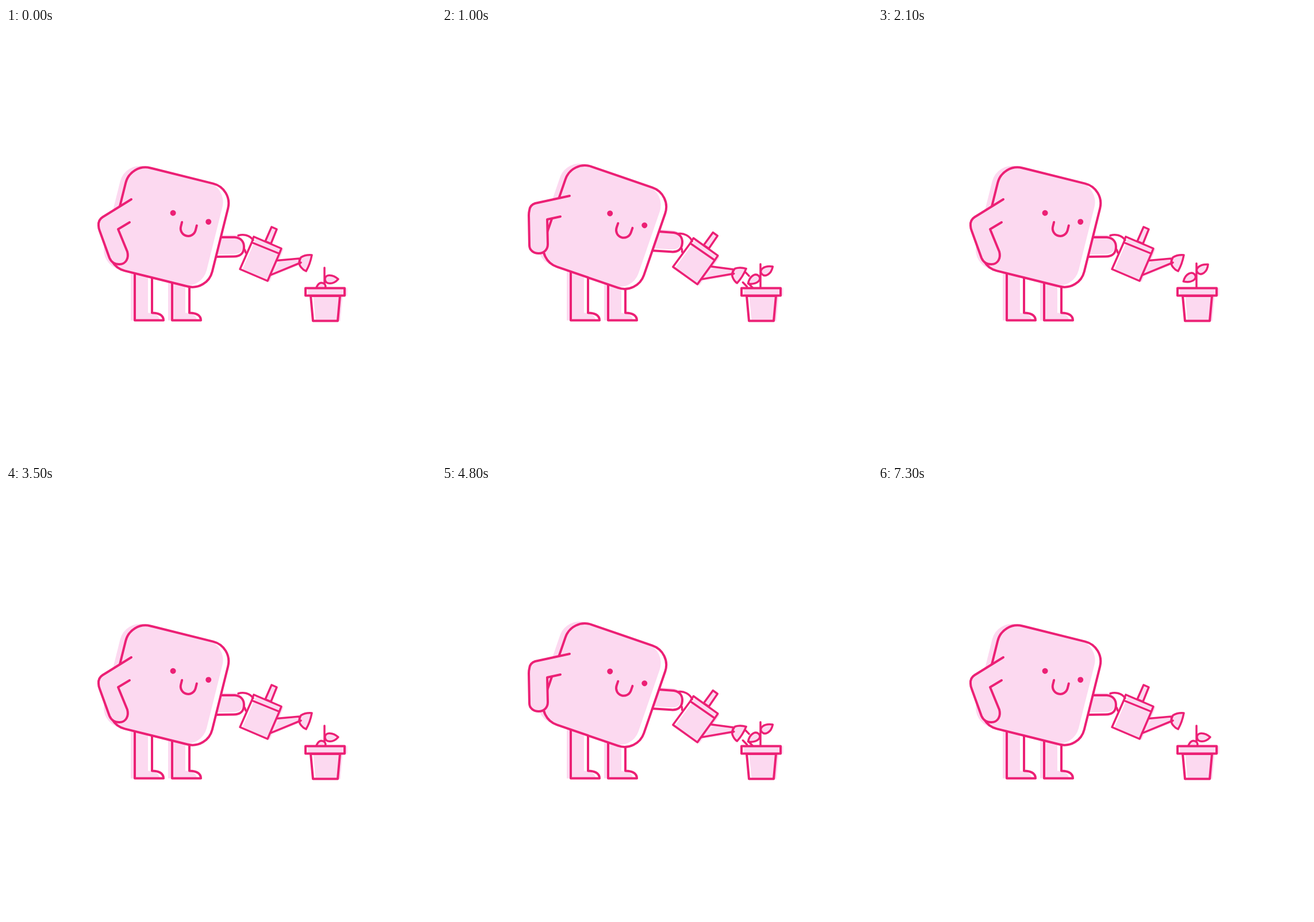
An HTML page that plays this animation: 748 by 748 pixels, repeating every 7.6 s.

```html
<!DOCTYPE html>
<html lang="en">
<head>
<meta charset="utf-8">
<title>Watering a plant</title>
<style>
  html, body { margin: 0; width: 100%; height: 100%; overflow: hidden; background: #fff; }
  svg { display: block; width: 100vw; height: 100vh; }
  .tint { fill: #fcd9f0; }
  .base { fill: #fff; }
  .line { fill: none; stroke: #ec2075; stroke-width: 4; stroke-linecap: round; stroke-linejoin: round; }
  .thin .line { stroke-width: 3.5; }
  .dot { fill: #ec2075; }
</style>
</head>
<body>
<svg viewBox="0 0 748 748">
  <defs>
    <clipPath id="above"><rect width="748" height="453"/></clipPath>
    <path id="leg" d="M224 400V508.5H274C274 500 266 495.5 254 495.5V400"/>
    <path id="hand" d="M-30 -17H0C11 -16 16 -9 16 0C16 10 10 16.5 -2 16.5L-38 17"/>
    <rect id="box" x="-91.7" y="-92.2" width="183.4" height="184.4" rx="35.5"/>
    <path id="leaf" d="M0 0C-1 -9 12 -10.5 23 0C13 10 1 8 0 0Z"/>
    <path id="pot" d="M521 452.5H589V465.5H521ZM530 466L534 509.5H577L581 466Z"/>
    <path id="can" d="M431 363L479 383.5L475.5 392.5L427.5 373ZM427.5 373L407 419.5L455 440L475.5 392.5Z"/>
    <path id="spout" d="M471 404.5L511 401Q509 412 513 408L459.5 430"/>
    <path id="rose" d="M532 395Q521 394 513 399Q507 410 514 417Q517 421 522 423Q529 411 532 395Z"/>
    <path id="stub" d="M462 346L471 350L461 375L451 371Z"/>
  </defs>

  <use class="tint" href="#leg" x="-7"/><use class="line" href="#leg"/>
  <use class="tint" href="#leg" x="58"/><use class="line" href="#leg" x="65"/>

  <g id="reach">
    <use class="tint" href="#hand" x="-1" y="-4"/><use class="line" href="#hand"/>
  </g>

  <g id="body">
    <use class="base" href="#box"/>
    <use class="tint" href="#box" x="-10"/>
    <use class="line" href="#box"/>
    <circle class="dot" cx="0.9" cy="-25.7" r="5"/>
    <circle class="dot" cx="64.4" cy="-25.7" r="5"/>
    <path class="line" d="M19.8 -14V-6A13.2 13.2 0 0 0 46.2 -6V-14.5"/>
  </g>
  <path id="armTint" class="tint"/><path id="armLine" class="line"/>

  <g id="pour" class="thin">
    <path class="line" d="M404 361C412 358 424 360 430 369M414 384Q416 386 417 391"/>
    <g class="tint" transform="translate(3.7 1.6)">
      <use href="#can"/><use href="#spout"/>
    </g>
    <use class="tint" href="#rose"/><use class="tint" href="#stub"/>
    <g class="line">
      <use href="#can"/><use href="#spout"/><use href="#rose"/><use href="#stub"/>
    </g>
  </g>

  <g class="thin" clip-path="url(#above)">
    <path id="stem" class="line"/>
    <g id="leafR"><use class="tint" href="#leaf"/><use class="line" href="#leaf"/></g>
    <g id="leafL"><use class="tint" href="#leaf"/><use class="line" href="#leaf"/></g>
    <path id="water" class="line"/>
  </g>
  <use class="tint" href="#pot" x="4.5"/><use class="line" href="#pot"/>
</svg>
<script>
const CYCLE = 3800, STEP = 100;
const get = id => document.getElementById(id);
const mix = (a, b, k) => a + (b - a) * k;
const ease = (t, from, to) => {
  const k = Math.min(1, Math.max(0, (t - from) / (to - from)));
  return (1 - Math.cos(Math.PI * k)) / 2;
};
const place = (id, x, y, turn) =>
  get(id).setAttribute('transform', `translate(${x} ${y}) rotate(${turn})`);

// The bent arm, at rest and while leaning
const ARM = 'M # # L # # Q # # # # Q # # # # L # # C # # # # # # C # # # # # # L # # L # #';
const REST = [218,298, 168,329, 160,334, 161,344, 161,348, 163,353, 180,400,
  184,409, 191,411, 197,411, 209,411, 214,400, 211,389, 195,350, 215,338];
const LEAN = [222,292, 162,305, 153,308, 152,317, 151,321, 151,326, 152,378,
  152,387, 160,392, 168,392, 178,392, 184,385, 184,376, 183,333, 206,328];

// Water streams: start x, start y, length, phase
const STREAMS = [[527,424,38,10], [520,431,30,29], [515,434,25,22]];
const SPEED = 0.09, GAP = 30, DASH = 10, DIR = [0.7, 0.714];

function waterPath(t) {
  let d = '';
  for (const [x, y, len, phase] of STREAMS) {
    for (let k = -2; k <= 2; k++) {
      const lead = phase + k * GAP, born = 1000 - lead / SPEED;
      if (born < 600 || born > 1200) continue;
      const head = (t - born) * SPEED;
      const a = Math.max(0, head - DASH), b = Math.min(len, head);
      if (b <= a) continue;
      d += `M${x + a * DIR[0]} ${y + a * DIR[1]}L${x + b * DIR[0]} ${y + b * DIR[1]}`;
    }
  }
  return d;
}

function draw(t) {
  const lean = ease(t, 0, 800) - ease(t, 1100, 1960);
  const grow = ease(t, 300, 1250) - ease(t, 2700, 3500);

  place('body', mix(283.5, 283, lean), 346.5, mix(14, 19, lean));
  place('reach', mix(398, 402, lean), mix(381, 373, lean), 4.5 * lean);
  get('pour').setAttribute('transform',
    `translate(${-2.3 * lean} ${4.2 * lean}) rotate(${12.5 * lean} 443 402)`);

  let i = 0;
  const arm = ARM.replace(/#/g, () => mix(REST[i], LEAN[i++], lean));
  get('armTint').setAttribute('d', arm);
  get('armLine').setAttribute('d', arm);

  get('stem').setAttribute('d', `M554 ${mix(417, 409.5, grow)}V456`);
  place('leafR', mix(555, 556.5, grow), mix(438, 426, grow), mix(-3, -40, grow));
  place('leafL', mix(552, 551, grow), mix(444, 429, grow), mix(121, 149, grow));
  get('water').setAttribute('d', waterPath(t));
}

const start = performance.now();
function tick() {
  const t = (performance.now() - start) % CYCLE;
  draw(Math.floor(t / STEP) * STEP);
  requestAnimationFrame(tick);
}
tick();
</script>
</body>
</html>
```
